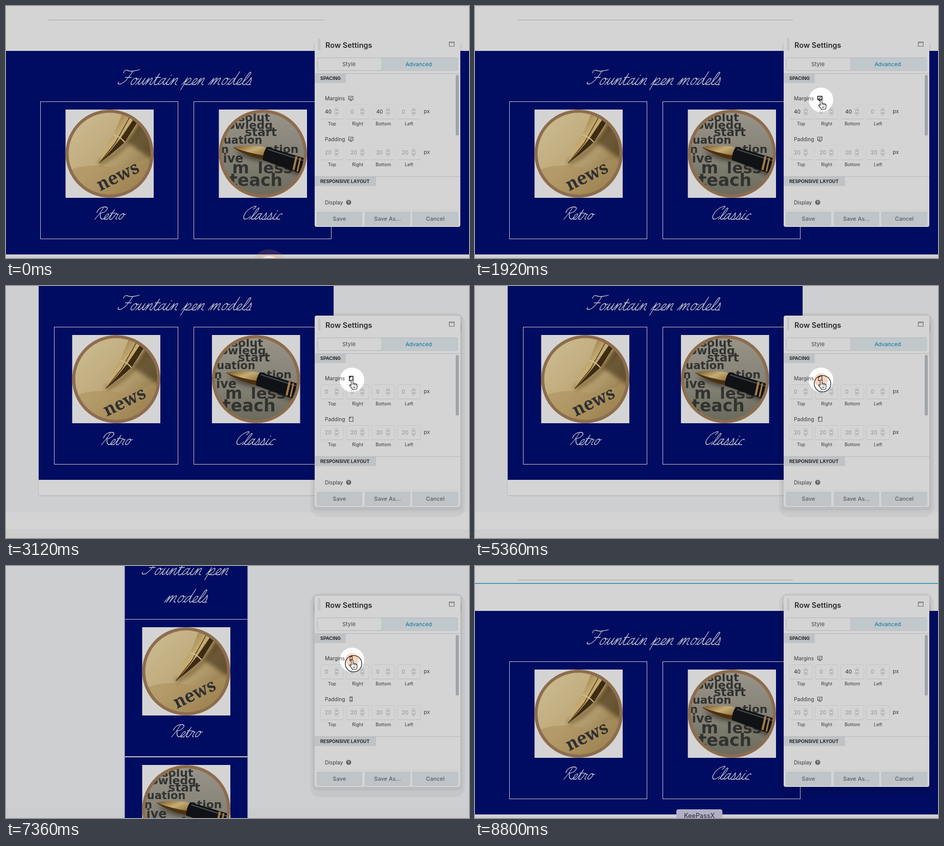
Recreate the animation shown at these times as an HTML page. Size 906x494 px, loop 9.04 s.

```html
<!DOCTYPE html>
<html lang="en">
<head>
<meta charset="utf-8">
<title>Row settings</title>
<style>
html, body { margin: 0; width: 100%; height: 100%; overflow: hidden; background: #d4d4d4; }
svg { display: block; font-family: Inter, "Open Sans", sans-serif; }
.m0, .m1, .m2 { display: none; }
[data-mode="0"] .m0, [data-mode="1"] .m1, [data-mode="2"] .m2 { display: inline; }
.script path { fill: none; stroke: #e6ebf5; stroke-linecap: round; stroke-linejoin: round; }
.frame { fill: none; stroke: #eceef6; }
.input { fill: #fff; stroke: #ebedee; }
[data-flat="true"] .input { stroke-opacity: .4; }
[data-flat="true"] .halo { display: none; }
.icon { fill: none; stroke: #666; stroke-width: 1.2; }
[data-hover="true"] .hot .icon { stroke: #111; stroke-width: 1.5; }
</style>
</head>
<body>
<script>
const LOOP = 9040, STEP = 80;

// Cursive strokes: [advance, path]; baseline 0, x-height 10, slanted when drawn.
const glyphs = {
  F: [18, 'M2 -18Q0 -23 6 -22Q13 -19 24 -23M15 -21Q12 -3 5 -1Q0 0 1 -4M8 -11H17'],
  R: [16, 'M9 -20Q7 -8 3 0M1 -12Q0 -22 12 -22Q20 -20 14 -13Q12 -11 8 -11Q11 -1 16 0'],
  C: [14, 'M13 -17Q18 -23 13 -22Q2 -18 2 -6Q4 2 10 -1Q13 -3 14 -5'],
  o: [11, 'M7 -10C2 -10 1 0 5 0C9 0 11 -10 7 -10Q8 -7 12 -9'],
  u: [12, 'M0 0Q3 -4 4 -10Q2 0 5 0Q8 -1 10 -10Q8 0 12 0'],
  n: [12, 'M0 0Q2 -6 4 -10Q4 -4 3 0Q6 -10 9 -10Q10 -9 9 -4Q8 0 12 0'],
  m: [17, 'M0 0Q2 -6 4 -10Q4 -4 3 0Q6 -10 9 -10Q9 -5 8 0Q11 -10 14 -10Q15 -9 14 -4Q13 0 17 0'],
  t: [8, 'M0 0Q3 -6 5 -17Q3 -3 4 -1Q5 1 8 0M1 -11H9'],
  a: [12, 'M0 0Q2 -1 3 -5M9 -9Q5 -11 3 -6Q1 0 4 0Q8 -1 10 -10Q7 0 12 0'],
  i: [7, 'M0 0Q3 -4 4 -10Q1 0 4 0Q6 0 7 0M4 -14l.6 -.6'],
  p: [12, 'M0 0Q3 -5 4 -11Q3 2 2 8M3 -2Q6 -10 9 -10Q12 -8 9 -3Q6 1 3 -1Q8 1 12 0'],
  e: [9, 'M0 0Q8 -3 8 -8Q7 -11 4 -8Q1 0 5 0Q7 0 9 0'],
  d: [12, 'M0 0Q2 -1 3 -5M9 -9Q5 -11 3 -6Q1 0 4 0Q8 -1 11 -20Q7 0 12 0'],
  l: [7, 'M0 0Q8 -10 8 -18Q6 -22 4 -12Q1 0 5 0Q6 0 7 0'],
  s: [9, 'M0 0Q4 -4 5 -11Q9 -2 6 0Q3 1 2 -1M6 0Q8 0 9 0'],
  r: [9, 'M0 0Q3 -5 3 -11Q5 -8 8 -9Q5 0 9 0'],
  c: [8, 'M0 0Q1 -1 2 -4M8 -8Q7 -11 4 -8Q0 0 4 0Q6 0 8 0']
};

function script(text, x, y, scale) {
  let pen = 0, out = '';
  for (const ch of text) {
    const [advance, d] = glyphs[ch] || [8, ''];
    if (d) out += `<path d="${d}" transform="translate(${pen})"/>`;
    pen += advance;
  }
  return `<g class="script" role="img" aria-label="${text}" stroke-width="${1.4 / scale}"
    transform="translate(${x} ${y}) scale(${scale}) skewX(-25)">${out}</g>`;
}

const rect = (x, y, w, h, fill, extra = '') =>
  `<rect x="${x}" y="${y}" width="${w}" height="${h}" fill="${fill}" ${extra}/>`;
const box = (x, y, w, h, cls = 'frame', r = 0) =>
  `<rect class="${cls}" x="${x}" y="${y}" width="${w}" height="${h}" rx="${r}"/>`;
const label = (text, x, y, size, fill = '#444', weight = 400, anchor = 'start') =>
  `<text x="${x}" y="${y}" font-size="${size}" fill="${fill}" font-weight="${weight}" text-anchor="${anchor}">${text}</text>`;

const title = 'Fountain pen models', TITLE_SCALE = 1.27;
const retro = (x, y) => `<use href="#nib" x="${x}" y="${y}"/>` + script('Retro', x + 54, y + 215, 1.1);
const classic = (x, y) => `<use href="#words" x="${x}" y="${y}"/>` + script('Classic', x + 43.5, y + 215, 1.15);

const photo = (id, body) => `<g id="${id}">${rect(0, 0, 172.5, 173, '#fff')}
  <g clip-path="url(#round)">${body}</g>
  <circle cx="86.2" cy="86.5" r="83.2" fill="none" stroke="#a9835c" stroke-width="6"/></g>`;

const nibPhoto = photo('nib', rect(0, 0, 173, 173, 'url(#sepia)') + `
  <path d="M0 173V122Q40 104 84 112T173 84V173Z" fill="#cfae70" opacity=".6"/>
  <path d="M120 64Q140 40 150 0H173V100Q150 84 120 64Z" fill="#4a3618" opacity=".6" filter="url(#blur)"/>
  <path d="M66 105Q96 92 120 66L150 30" fill="none" stroke="#5d4219" stroke-width="9" opacity=".5" filter="url(#blur)"/>
  <path d="M66 105Q74 74 94 50L114 0H156L116 64Q92 86 66 105Z" fill="url(#gold)"/>
  <path d="M66 105Q92 86 116 64L156 0H146L108 56Q88 82 66 105Z" fill="#4b3414"/>
  <path d="M66 105L97 66L126 14" fill="none" stroke="#5a4218" stroke-width="1.5"/>
  <path d="M94 50Q106 52 116 64" fill="none" stroke="#fbe7ae" stroke-width="2"/>
  <text transform="translate(68 160) rotate(-26)" font-family="'Noto Serif', serif" font-weight="700"
    font-size="34" fill="#36373a">news</text>`);

const wordRows = [['solut', 38, 23, 22], ['owledg', 16, 38, 22], ['start', 51, 52, 23],
  ['luation', 2, 67, 21], ['n', 4, 85, 22], ['vation', 78, 85, 22], ['ive', 8, 104, 24],
  ['m', 26, 125, 32], ['less', 76, 125, 31], ['teach', 21, 150, 33]];
const wordsPhoto = photo('words', rect(0, 0, 173, 173, 'url(#stone)') +
  `<g font-family="'DejaVu Sans', sans-serif">` +
  wordRows.map(([w, x, y, size]) => label(w, x, y, size, '#3b3d3a', 700)).join('') + `</g>
  <path d="M30 82Q60 102 92 102L168 134V116L92 86Z" fill="#2b2820" opacity=".6" filter="url(#blur)"/>
  <path d="M27 74Q58 67 94 74L87 98Q55 93 27 74Z" fill="url(#gold)"/>
  <path d="M27 74Q55 93 87 98L89 90Q60 86 27 74Z" fill="#593c14"/>
  <path d="M94 73L173 97V130L86 99Q86 84 94 73Z" fill="#14161b"/>
  <path d="M96 78L172 102" stroke="#5a6068" stroke-width="2"/>
  <path d="M150 91l4 1l-6 27l-4 -1ZM158 94l3 1l-6 27l-3 -1Z" fill="#c69750"/>`);

const desktop = rect(0, 0, 906, 494, '#fff') + rect(83, 27, 539, 1, '#c3c3c3') +
  rect(0, 88, 906, 399, '#000e75') + rect(0, 487, 906, 7, '#f9f9ff') +
  script(title, 217, 154, TITLE_SCALE) + box(67.5, 187.5, 269, 269) + box(367.5, 187.5, 269, 269) +
  retro(116.5, 203) + classic(416.5, 203);

const tablet = rect(0, 0, 906, 494, '#f8f9fb') + rect(0, 444, 906, 33, '#fff') +
  rect(0, 477, 906, 17, '#f6f6f8') + rect(63, -4, 579, 416, '#e2e4e7', 'rx="4"') +
  rect(64, 0, 577, 410, '#fff') + rect(64, 0, 577, 380, '#000e75') +
  script(title, 217, 47, TITLE_SCALE) + box(94.5, 80.5, 242, 269) + box(367.5, 80.5, 242, 269) +
  retro(129.5, 96) + classic(403, 96);

const mobile = rect(0, 0, 906, 494, '#f8f9fb') + rect(0, 476, 906, 18, '#f4f5f7') +
  rect(231, 0, 243, 494, '#e1e4ea') + rect(232.5, 0, 240, 494, '#000e75') +
  script('Fountain pen', 264, 17, TITLE_SCALE) + script('models', 310, 71, TITLE_SCALE) +
  rect(232.5, 104, 240, 1, '#eceef6') + rect(232.5, 373, 240, 2, '#eceef6') +
  retro(266.5, 120) + classic(266.5, 390);

const deviceIcon = (y, cls) => `<g class="${cls}" transform="translate(675 ${y})">
  <path class="icon m0" d="M-4.5 -4H4V2.5H-4.5ZM-2.5 4.5H2.5M0 2.5V4.5M-2.5 1L1.5 -2"/>
  <path class="icon m1" d="M-3 -4H4V4.5H-3ZM-3 -1L0 -4M-1.5 4.5H2.5"/>
  <path class="icon m2" d="M-2 -4.5H2.5V4.5H-2ZM-2 2.5H2.5M-1 -3H1.5"/></g>`;

const spinner = (x, y) => `<g fill="none" stroke="#888">${rect(x, y - 7, 6, 14, '#fff', 'rx="2.5" stroke="#cfd2d4"')}
  <path d="M${x + 1.3} ${y - 2}l1.7 -2l1.7 2M${x + 1.3} ${y + 2}l1.7 2l1.7 -2"/></g>`;

function fields(y, desk, other) {
  const value = (v, x, cls) => `<g class="${cls}">${label(v, x, y + 4, 10.2, v === 40 ? '#333' : '#aaa')}</g>`;
  return ['Top', 'Right', 'Bottom', 'Left'].map((name, i) => {
    const x = 616 + 50.2 * i;
    return box(x - .5, y - 13.5, 45, 28, 'input', 3) + rect(x, y + 14, 44, 1, '#e0e2e4') +
      value(desk[i], x + 8, 'm0') + value(other, x + 8, 'm1') + value(other, x + 8, 'm2') +
      spinner(x + 28, y) + label(name, x + 22, y + 27, 9, '#444', 400, 'middle');
  }).join('') + label('px', 817.5, y + 3, 10.5);
}

const section = (name, y, w) => rect(604, y, 285, 1, '#d9dcdf') + rect(604, y + 1, w, 18, '#e5eaee') +
  label(name, 615, y + 13, 9, '#333', 700);
const button = (name, x, w) => rect(x, 403, w, 28, '#e4ebef', 'rx="2"') +
  label(name, x + w / 2, 421, 11, '#6b7378', 500, 'middle');

let grip = '';
for (let y = 64; y < 87; y += 3) grip += rect(611, y, 1.5, 1, '#aaa') + rect(613.5, y, 1.5, 1, '#aaa');

const panel = `<g class="halo">${rect(595, 53, 303, 400, '#000', 'rx="20" opacity=".045"')}
    ${rect(600, 56, 293, 384, '#000', 'rx="9" opacity=".05"')}</g>` +
  rect(601, 70, 291, 24, '#000', 'rx="8" opacity=".06"') +
  rect(604, 58, 285, 375, '#fff', 'rx="4"') + grip +
  label('Row Settings', 625, 82, 14.5, '#333', 600) +
  `<path d="M867.5 70.5H877V79H867.5ZM867 72H877.5" fill="none" stroke="#888" stroke-width="1.2"/>` +
  rect(609.5, 101.5, 274, 25, '#fff', 'rx="2" stroke="#d5dade"') + rect(734, 102, 149.5, 24.5, '#e8f0f4') +
  label('Style', 671, 118, 11, '#555', 400, 'middle') +
  label('Advanced', 807.5, 118, 10.8, '#0a8fbd', 400, 'middle') +
  section('SPACING', 132, 61) + label('Margins', 624, 184.5, 10.3) + deviceIcon(181, 'hot') +
  fields(207, [40, 0, 40, 0], 0) +
  label('Padding', 624, 264.5, 10.2) + deviceIcon(261, '') + fields(287, [20, 20, 20, 20], 20) +
  section('RESPONSIVE LAYOUT', 334, 120) + label('Display', 624, 388.5, 10.2) +
  '<circle cx="670.5" cy="385" r="5" fill="#777"/>' + label('?', 670.5, 388, 8, '#fff', 700, 'middle') +
  rect(880, 135, 6, 119, '#c0c6cb', 'rx="3"') + rect(604, 399, 285, 1, '#f4f4f4') +
  button('Save', 608, 89) + button('Save As...', 702, 89) + button('Cancel', 795, 90);

document.body.innerHTML = `<svg width="906" height="494" viewBox="0 0 906 494">
<defs>
  <filter id="blur"><feGaussianBlur stdDeviation="4"/></filter>
  <clipPath id="round"><circle cx="86.2" cy="86.5" r="85"/></clipPath>
  <linearGradient id="sepia" x2="1" y2="1"><stop stop-color="#f8e6b6"/><stop offset=".5" stop-color="#e4cb92"/><stop offset="1" stop-color="#8d6c36"/></linearGradient>
  <linearGradient id="stone" x2="0" y2="1"><stop stop-color="#b9b2a6"/><stop offset=".6" stop-color="#9d998b"/><stop offset="1" stop-color="#7c7e6c"/></linearGradient>
  <linearGradient id="gold" x2="1" y2="1"><stop stop-color="#866027"/><stop offset=".45" stop-color="#edd08c"/><stop offset="1" stop-color="#8c6226"/></linearGradient>
  ${nibPhoto}${wordsPhoto}
</defs>
<g class="m0">${desktop}</g><g class="m1">${tablet}</g><g class="m2">${mobile}</g>
<rect id="rowEdge" y="33.5" width="906" height="1.5" fill="#1da9cf"/>
${panel}
<g id="tip">${rect(394, 477, 90, 30, '#d3d3ef', 'rx="4"')}${label('KeePassX', 439, 494, 12.7, '#333', 400, 'middle')}</g>
<path id="dim" fill-rule="evenodd" fill-opacity=".17"
  d="M-1000 -1000H2000V2000H-1000ZM-24 0a24 24 0 1 0 48 0a24 24 0 1 0 -48 0"/>
<g id="pointer">
  <circle id="ripple" fill="#f0945c"/>
  <g id="ring" fill="none"><circle cx="3" cy="7.5" r="17.3" stroke="#fff"/><circle cx="3" cy="7.5" r="16.2" stroke="#222" stroke-width="1.3"/></g>
  <path id="arrow" d="M0 0V13L3 10.3L5.3 15.5L7.7 14.4L5.4 9.3H9.5Z" fill="#111" stroke="#fff" stroke-width=".8"/>
  <path id="hand" d="M-1.5 2Q-1.5 0 .3 0Q2 0 2 2V7Q4.5 5.8 5 7.6Q7.4 6.6 7.8 8.4Q10 8 10 10.2V14Q10 16 8.5 18.5H1Q-.5 15.5 -4.5 11.5Q-5 9.3 -3 9.5L-1.5 11ZM2 7V10M5 8V11M7.8 9V11M2.8 13V16M5.5 13V16"
    fill="#fff" stroke="#333" stroke-width="1.2" stroke-linejoin="round"/>
</g></svg>`;

const svg = document.querySelector('svg');
const el = id => document.getElementById(id);
const show = (id, on) => { el(id).style.display = on ? '' : 'none'; };

// Pointer route: [time, x, y]
const route = [[160, 515, 514], [640, 790, 300], [800, 813, 190], [960, 740, 160], [1120, 668, 167],
  [1440, 675, 176], [1600, 675, 176], [1760, 687, 180], [1920, 677, 184], [8160, 677, 184],
  [8400, 606, 270], [8720, 440, 521]];
const clicks = [-160, 2800, 5360, 7360];

function position(t) {
  const i = route.findIndex(p => p[0] >= t);
  if (i < 0) return route.at(-1).slice(1);
  if (!i) return route[0].slice(1);
  const a = route[i - 1], b = route[i], u = (t - a[0]) / (b[0] - a[0]);
  return [a[1] + (b[1] - a[1]) * u, a[2] + (b[2] - a[2]) * u];
}

function draw(now) {
  const t = Math.floor(now % LOOP / STEP) * STEP;
  const mode = t < 3120 || t >= 7680 ? 0 : t < 5840 ? 1 : 2;
  const hover = t >= 1440 && t < 8240;
  const [x, y] = position(t);
  svg.dataset.mode = mode;
  svg.dataset.hover = hover;
  svg.dataset.flat = mode === 0 && t < 8400;
  for (const id of ['dim', 'pointer']) el(id).setAttribute('transform', `translate(${x} ${y})`);
  show('rowEdge', t >= 8400);
  show('tip', t >= 8800);
  show('hand', hover);
  show('arrow', !hover);

  const click = clicks.find(c => t >= c && t < c + 240);
  const phase = (t - click) / STEP;
  show('ripple', click !== undefined);
  show('ring', phase < 2);
  if (click !== undefined) {
    el('ripple').setAttribute('r', 13 + 12 * phase);
    el('ripple').setAttribute('opacity', .4 - .11 * phase);
  }
  requestAnimationFrame(draw);
}
draw(0);
</script>
</body>
</html>
```
